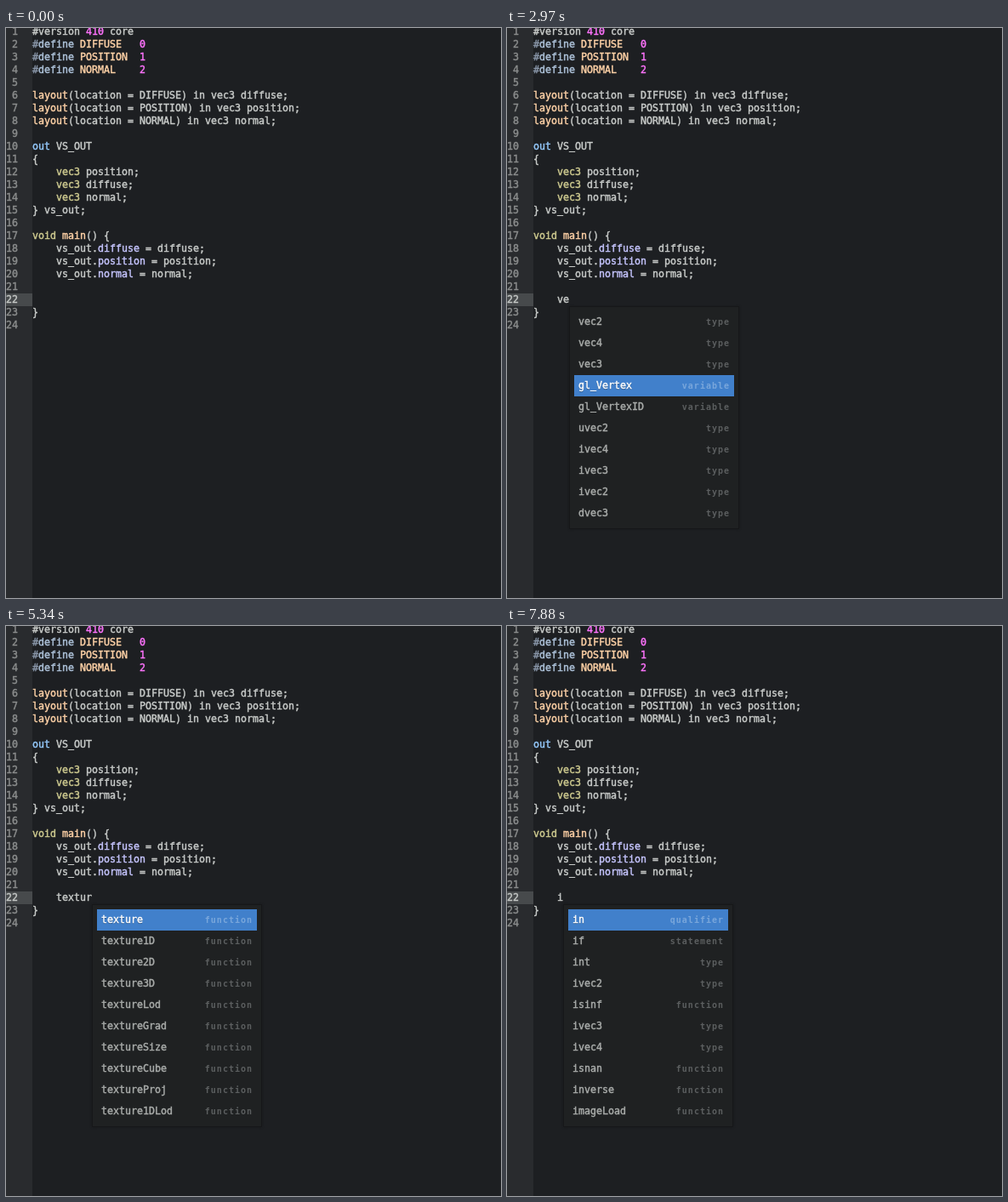
Animation, 582 px wide and 670 px high, one loop 8 s. Source, as an HTML page:

```html
<!DOCTYPE html>
<html lang="en">
<head>
<meta charset="utf-8">
<title>Shader autocomplete</title>
<style>
  html, body { margin: 0; width: 100%; height: 100%; overflow: hidden; background: #1d1f22; }
  body {
    position: relative;
    font: 11.63px/15px "DejaVu Sans Mono", monospace;
    color: #c9ccca;
    white-space: pre;
    -webkit-text-stroke: .42px;
    font-variant-ligatures: none;
  }
  .gutter { position: absolute; left: 0; top: 0; width: 31px; height: 100%; background: #292b2e; color: #8b8d8d; }
  .num { position: absolute; left: 0; width: 14px; padding-right: 17px; height: 15px; text-align: right; }
  .num.active { background: #474a4c; color: #c5c8c6; }
  .line { position: absolute; left: 31px; height: 15px; }
  .line b { font-weight: normal; }
  .hash { color: #8996a8; }
  .define { color: #afc4db; }
  .name { color: #ffd2a7; }
  .number { color: #ff73fd; }
  .key { color: #96cbfe; }
  .type { color: #cfcb90; }
  .field { color: #c6c5fe; }
  #caret { position: absolute; top: 312px; width: 1px; height: 15px; background: #fff; }
  #popup {
    position: absolute; top: 327px; width: 188px; padding: 5px;
    background: #1f2122; border: 1px solid #161719;
    box-shadow: 0 0 3px rgba(0, 0, 0, .25);
  }
  .row { display: flex; justify-content: space-between; height: 25px; line-height: 25px; padding: 0 5px; color: #aaadab; }
  .row i { font: bold 10px/25px "DejaVu Sans Mono", monospace; letter-spacing: 1px; color: #5b5e5f; -webkit-text-stroke: 0; }
  .row.on { background: #4180cb; color: #fff; text-shadow: 0 1px 1px rgba(0, 0, 0, .4); }
  .row.on i { color: #79a6db; text-shadow: none; }
</style>
</head>
<body>
<div class="gutter" id="gutter"></div>
<div id="code"></div>
<div id="caret"></div>
<div id="popup"></div>
<script>
const LOOP = 8000, CHAR = 7, LINE = 15, TOP = -3, INDENT = 59, ACTIVE = 22;
const $ = id => document.getElementById(id);

// {class:text} marks a coloured token; plain braces are left alone.
const source = `#version {number:410} core
{hash:#}{define:define} {name:DIFFUSE}   {number:0}
{hash:#}{define:define} {name:POSITION}  {number:1}
{hash:#}{define:define} {name:NORMAL}    {number:2}

{name:layout}(location = DIFFUSE) in vec3 diffuse;
{name:layout}(location = POSITION) in vec3 position;
{name:layout}(location = NORMAL) in vec3 normal;

{key:out} VS_OUT
{
    {type:vec3} position;
    {type:vec3} diffuse;
    {type:vec3} normal;
} vs_out;

{type:void} {name:main}() {
    vs_out.{field:diffuse} = diffuse;
    vs_out.{field:position} = position;
    vs_out.{field:normal} = normal;


}
`;

function add(parent, tag, cls, html) {
  const el = document.createElement(tag);
  el.className = cls;
  el.innerHTML = html;
  parent.append(el);
  return el;
}

let typed;
source.split("\n").forEach((text, i) => {
  const top = TOP + i * LINE + "px";
  const active = i + 1 === ACTIVE;
  add($("gutter"), "div", active ? "num active" : "num", i + 1).style.top = top;
  const html = text.replace(/\{(\w+):([^}]*)\}/g, '<b class="$1">$2</b>');
  const line = add($("code"), "div", "line", html);
  line.style.top = top;
  if (active) {
    line.style.left = INDENT + "px";
    typed = line;
  }
});

const kinds = { t: "type", v: "variable", f: "function", q: "qualifier", s: "statement" };
const lists = {
  v: "vec2:t vec4:t vec3:t void:t varying:q volatile:q uvec2:t ivec4:t ivec3:t ivec2:t",
  ve: "vec2:t vec4:t vec3:t gl_Vertex:v gl_VertexID:v uvec2:t ivec4:t ivec3:t ivec2:t dvec3:t",
  t: "tan:f tanh:f true:v trunc:f texture:f texture1D:f texture2D:f texture3D:f transpose:f texelFetch:f",
  tex: "texture:f texture1D:f texture2D:f texture3D:f texelFetch:f textureLod:f textureGrad:f textureSize:f textureCube:f textureProj:f",
  texture: "texture:f texture1D:f texture2D:f texture3D:f textureLod:f textureGrad:f textureSize:f textureCube:f textureProj:f texture1DLod:f",
  size: "textureSize:f",
  i: "in:q if:s int:t ivec2:t isinf:f ivec3:t ivec4:t isnan:f inverse:f imageLoad:f"
};

// time, typed text, caret shown, suggestion list, selected row
const steps = [
  [0, "", 0],
  [450, "", 1],
  [600, "v", 0],
  [740, "v", 0, "v", 0],
  [1040, "ve", 0, "v", 0],
  [1190, "ve", 0, "ve", 0],
  [1790, "ve", 0, "ve", 1],
  [2240, "ve", 0, "ve", 2],
  [2680, "ve", 0, "ve", 3],
  [2830, "ve", 0, "ve", 4],
  [2970, "ve", 0, "ve", 3],
  [3120, "ve", 0, "ve", 4],
  [3270, "gl_VertexID", 1],
  [3860, "gl_VertexID", 0],
  [4010, "", 1],
  [4600, "t", 0],
  [4740, "te", 0, "t", 0],
  [4890, "tex", 0, "tex", 0],
  [5040, "text", 0, "tex", 0],
  [5190, "textu", 0, "texture", 0],
  [5340, "textur", 0, "texture", 0],
  [5490, "texture", 0, "texture", 0],
  [5640, "texture", 1, "texture", 0],
  [5790, "texturei", 1, "texture", 0],
  [5940, "texturei", 1, "size", 0],
  [6090, "texturein", 1, "size", 0],
  [6240, "texturein", 1],
  [6690, "texturein", 0],
  [6980, "texturein", 1],
  [7130, "", 0],
  [7280, "", 1],
  [7730, "i", 0],
  [7880, "i", 0, "i", 0]
];

function row(item, on) {
  const [name, kind] = item.split(":");
  return `<div class="row${on ? " on" : ""}"><span>${name}</span><i>${kinds[kind]}</i></div>`;
}

function show([, text, caret, list, selected]) {
  const x = INDENT + text.length * CHAR + "px";
  typed.textContent = text;
  $("caret").style.left = $("popup").style.left = x;
  $("caret").hidden = !caret;
  $("popup").hidden = !list;
  $("popup").innerHTML = list
    ? lists[list].split(" ").map((item, i) => row(item, i === selected)).join("")
    : "";
}

const start = performance.now();
let current;
function tick() {
  const t = (performance.now() - start) % LOOP;
  const step = steps.findLast(s => s[0] <= t);
  if (step !== current) show(current = step);
  requestAnimationFrame(tick);
}
tick();
</script>
</body>
</html>
```
